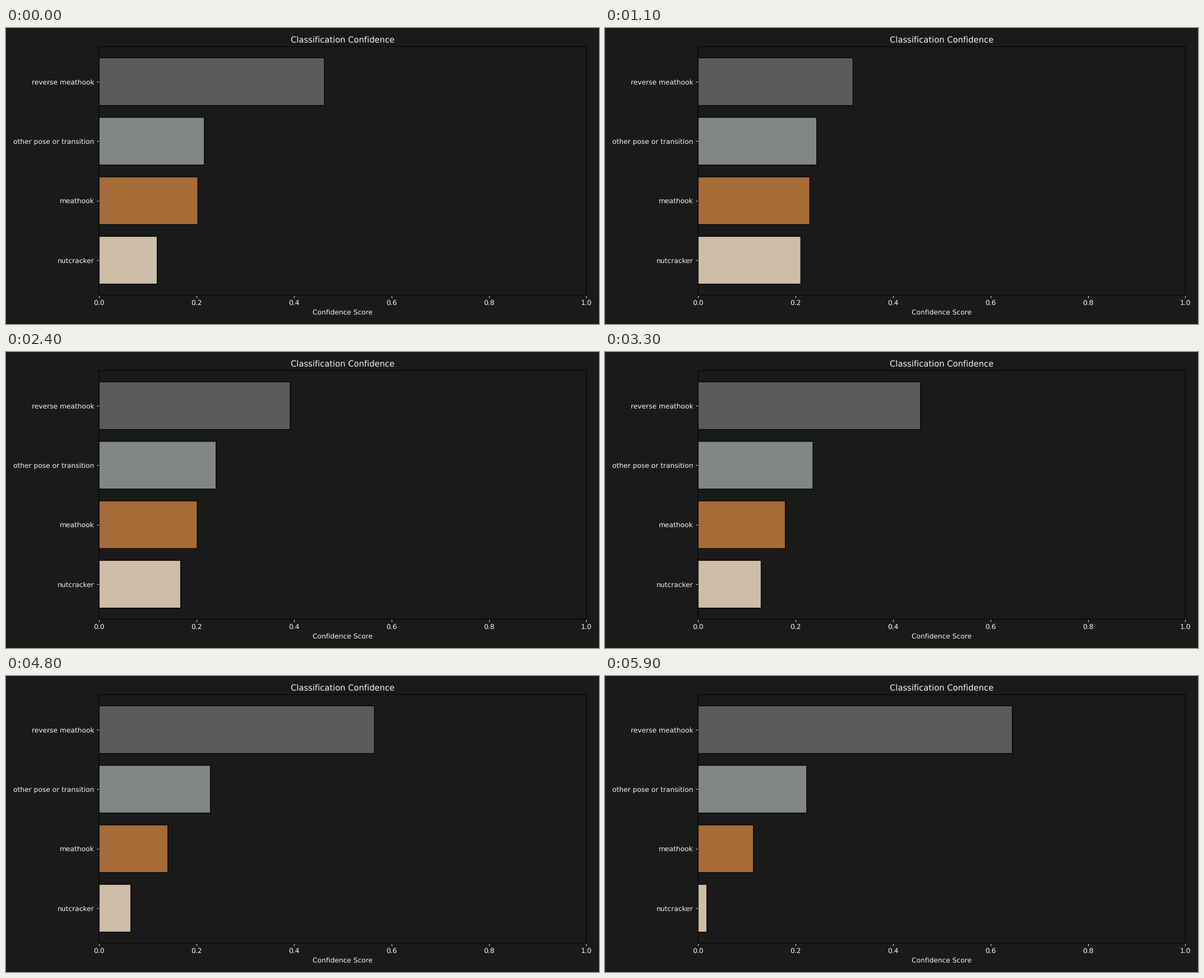
Recreate the animation shown at these times as a matplotlib script. Size 1058 px wide and 529 px high, loop 6 s.

```python
import matplotlib.pyplot as plt
from matplotlib.animation import FuncAnimation

WIDTH, HEIGHT = 1058, 529
FRAMES, INTERVAL = 60, 100
BACKGROUND, TEXT = "#1a1a1a", "#f5f5f5"
SETTLE = 0.8  # share of the opening offset kept from frame to frame

# label, colour, opening score, start and end of the steady drift
BARS = [
    ("nutcracker", "#cebda8", 0.1192, 0.271, 0.0180),
    ("meathook", "#a66b37", 0.2027, 0.262, 0.1136),
    ("other pose or transition", "#828785", 0.2160, 0.252, 0.2230),
    ("reverse meathook", "#5a5b5a", 0.4623, 0.217, 0.6448),
]


def score(frame, opening, drift_start, drift_end):
    drift = drift_start + (drift_end - drift_start) * frame / (FRAMES - 1)
    return drift + (opening - drift_start) * SETTLE ** frame


# Unhinted text and unsnapped edges keep sub-pixel positions.
plt.rcParams.update({"text.hinting": "none", "path.snap": False})
labels, colors, *_ = zip(*BARS)

fig, ax = plt.subplots(figsize=(12, 6), dpi=WIDTH / 12, facecolor=BACKGROUND)
fig.subplots_adjust(left=166 / WIDTH, right=1035.4 / WIDTH,
                    top=1 - 33.2 / HEIGHT, bottom=1 - 477.8 / HEIGHT)
ax.set_facecolor(BACKGROUND)
bars = ax.barh(labels, [bar[2] for bar in BARS], color=colors,
               edgecolor="black", linewidth=1)
ax.set_xlim(0, 1)
ax.set_title("Classification Confidence", color=TEXT)
ax.set_xlabel("Confidence Score", color=TEXT)
ax.tick_params(colors=TEXT)


def update(frame):
    for patch, (_, _, *path) in zip(bars, BARS):
        patch.set_width(score(frame, *path))
    return list(bars)


anim = FuncAnimation(fig, update, frames=FRAMES, interval=INTERVAL,
                     repeat=True, repeat_delay=0)
plt.show()
```
